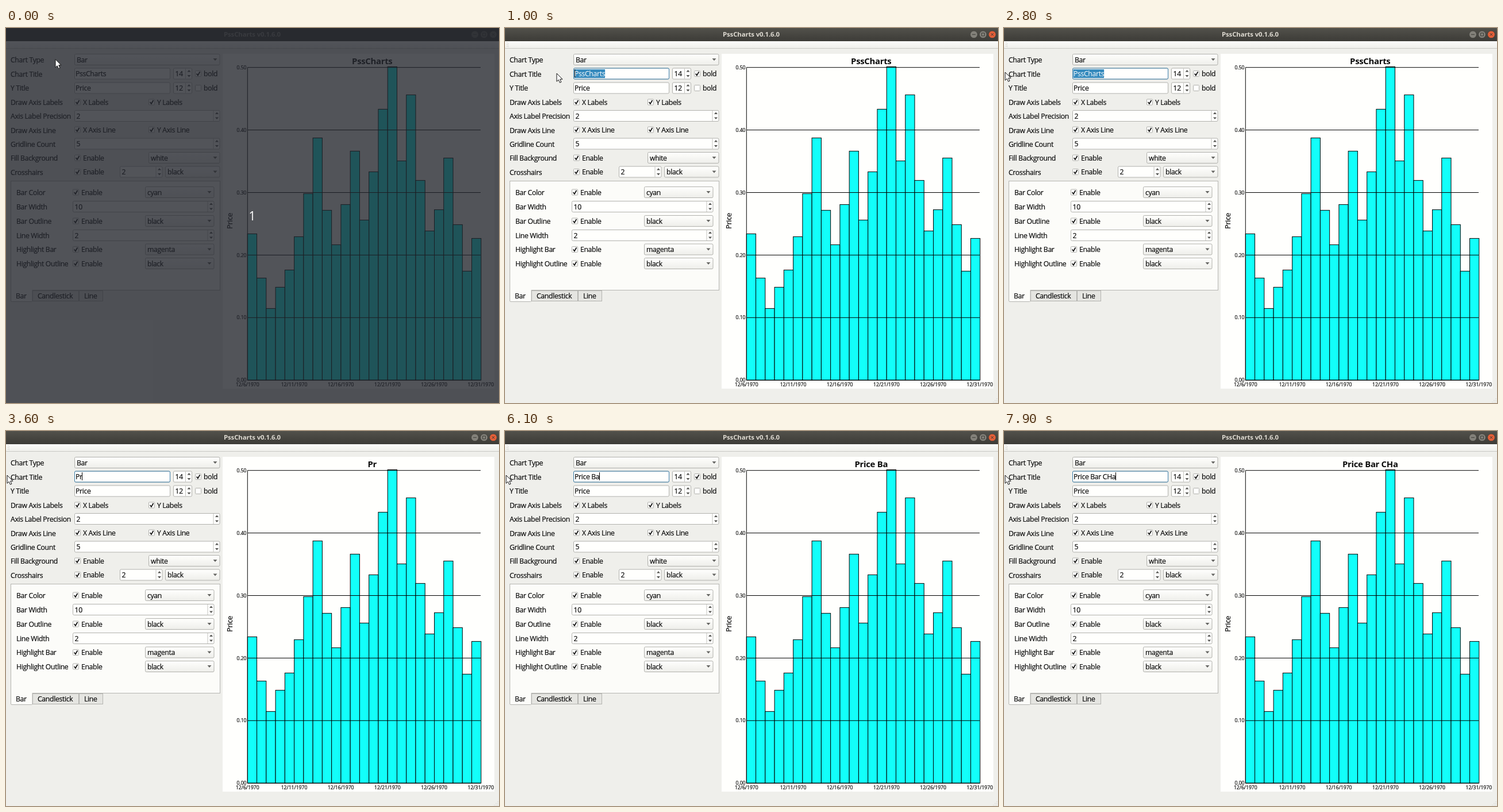
An HTML page that plays this animation: 858 by 653 pixels, repeating every 8 s.

```html
<!DOCTYPE html>
<html lang="en">
<head>
<meta charset="utf-8">
<title>Chart settings</title>
<style>
  html, body { margin: 0; width: 100%; height: 100%; overflow: hidden; background: #efefeb; }
  svg { display: block; }
  text { font: 12.2px 'Open Sans', 'Noto Sans', sans-serif; letter-spacing: -.32px; fill: #0c0c0c; stroke: #0c0c0c; stroke-width: .22px; white-space: pre; }
  .heading { font-size: 14.9px; font-weight: 700; letter-spacing: -.3px; text-anchor: middle; stroke: none; }
  .caption { font-size: 11.4px; font-weight: 700; letter-spacing: -.12px; text-anchor: middle; stroke: none; }
  .tick { font-size: 8.6px; letter-spacing: 0; }
  .light { fill: #fff; stroke: none; }
  .mid { text-anchor: middle; }
  .end { text-anchor: end; }
  .crisp { shape-rendering: crispEdges; }
</style>
</head>
<body>
<svg id="stage" width="858" height="653" viewBox="0 0 858 653"></svg>
<script>
const LOOP = 8000;
const stage = document.getElementById('stage');

// Drawing helpers
const label = (x, cy, s) => `<text x="${x}" y="${cy + 4.5}">${s}</text>`;
const rect = (x, y, w, h, attrs) => `<rect x="${x}" y="${y}" width="${w}" height="${h}" ${attrs}/>`;
const path = (d, attrs = '') => `<path d="${d}" ${attrs}/>`;

// Widgets: left edge, right edge, vertical centre, content
const frame = (l, r, cy, fill) =>
  rect(l + .5, cy - 9.5, r - l - 1, 19, `rx="2" fill="${fill}" stroke="#b1b1ad"`);
const field = (l, r, cy, s) => frame(l, r, cy, '#fffffd') + label(l + 2, cy, s);
const combo = (l, r, cy, s) => frame(l, r, cy, 'url(#button)') + label(l + 4, cy, s) +
  path(`M${r - 12} ${cy - 2}h7l-3.5 4z`, 'fill="#666663"');
const spin = (l, r, cy, s) => frame(l, r, cy, '#fffffd') + label(l + 3.5, cy, s) +
  path(`M${r - 11.5} ${cy - 9}v18`, 'stroke="#c4c4c0"') +
  path(`M${r - 8.5} ${cy - 3}h6l-3-3.5zM${r - 8.5} ${cy + 2.5}h6l-3 3.5z`, 'fill="#555552"');
const check = (x, cy, s, on = true) =>
  rect(x - 5, cy - 5, 10, 10, 'rx="1" fill="#fffffd" stroke="#b1b1ad"') +
  (on ? path(`M${x - 2.8} ${cy}l2.2 3l3.6-6.2`, 'fill="none" stroke="#111" stroke-width="1.7"') : '') +
  label(x + 9.5, cy, s);

function form() {
  const names = ['Chart Type', 'Chart Title', 'Y Title', 'Draw Axis Labels', 'Axis Label Precision',
    'Draw Axis Line', 'Gridline Count', 'Fill Background', 'Crosshairs'];
  return names.map((s, i) => label(8, Math.round(55.3 + i * 24.45), s)).join('') +
    combo(119, 372.5, 55, 'Bar') +
    field(119, 286, 79.5, '') + spin(291, 324, 79.5, '14') + check(334.5, 79.5, 'bold') +
    field(119, 286, 104.5, 'Price') + spin(291, 324, 104.5, '12') + check(334.5, 104.5, 'bold', false) +
    check(124.5, 129, 'X Labels') + check(253.5, 129, 'Y Labels') +
    spin(119, 372.5, 153, '2') +
    check(124.5, 177, 'X Axis Line') + check(253.5, 177, 'Y Axis Line') +
    spin(119, 372.5, 201.5, '5') +
    check(124.5, 226, 'Enable') + combo(248, 372.5, 226, 'white') +
    check(124.5, 250.5, 'Enable') + spin(198, 272.5, 250.5, '2') + combo(277, 372.5, 250.5, 'black');
}

function tabs() {
  const edge = 'stroke="#b5b5b1"';
  const row = (cy, name, color) => label(18, cy, name) + check(121.5, cy, 'Enable') + combo(242, 362.5, cy, color);
  return rect(8.5, 266.5, 364, 190, `fill="#fcfcf9" ${edge}`) +
    rect(46.5, 457.5, 80, 18, `fill="#e5e5e1" ${edge}`) +
    rect(127.5, 457.5, 41, 18, `fill="#e5e5e1" ${edge}`) +
    path('M8.5 456V475q0 1.5 1.5 1.5H44.5q1.5 0 1.5-1.5V456', `fill="#fcfcf9" ${edge}`) +
    label(17, 466.5, 'Bar') + label(55, 466, 'Candlestick') + label(136, 466, 'Line') +
    row(286, 'Bar Color', 'cyan') +
    label(18, 311, 'Bar Width') + spin(116, 362.5, 311, '10') +
    row(336, 'Bar Outline', 'black') +
    label(18, 361, 'Line Width') + spin(116, 362.5, 361, '2') +
    row(385.5, 'Highlight Bar', 'magenta') +
    row(410, 'Highlight Outline', 'black');
}

function chart() {
  const tops = [358, 435, 488, 451, 421, 363, 288, 191, 317, 377, 307, 214, 334,
    250, 141, 67, 231, 116, 265, 353, 316, 226, 342, 423, 366];
  const left = 420.3, base = 613.2, step = 16.26, gap = 108.9;
  const gridY = i => base - gap * (5 - i);
  let s = rect(377, 45, 473, 583, 'fill="#fffffd"') + '<g stroke="#000">';
  tops.forEach((y, i) => {
    s += rect(left + i * step, y + .4, step, base - y - .4, 'fill="#12fffa"');
  });
  for (let i = 0; i < 6; i++) s += path(`M${left} ${gridY(i)}H826`);
  s += path(`M${left} ${gridY(0)}V${base}`) + '</g>';
  for (let i = 0; i < 6; i++) {
    s += `<text class="tick end" x="418.5" y="${gridY(i) + 3.1}">${(.5 - i / 10).toFixed(2)}</text>`;
    s += `<text class="tick mid" x="${left + i * 81.2}" y="623.6">12/${i < 5 ? 6 + i * 5 : 31}/1970</text>`;
  }
  return s + '<text class="mid" transform="translate(394 336) rotate(-90)" style="font-size:12.8px">Price</text>';
}

function windowBar() {
  let s = rect(0, 0, 858, 23, 'id="bar"') + '<text id="caption" class="caption" x="428.5" y="15.2">PssCharts v0.1.6.0</text>';
  [816, 832, 848].forEach((x, i) => {
    s += `<circle class="knob" cx="${x}" cy="11.3" r="6.3" stroke="#3a3934" stroke-width=".6"/>`;
    s += path([`M${x - 3} 11.3h6`, `M${x - 2.5} 8.8h5v5h-5z`, `M${x - 2.2} 9.1l4.4 4.4m0-4.4l-4.4 4.4`][i],
      'fill="none" stroke="#3d3c37"');
  });
  s += rect(0, 23, 858, 12, 'fill="url(#tools)"') + path('M0 35.5H858', 'stroke="#c9c9c5"');
  return s + path('M3.5 25V34M5.5 26V34', 'stroke="#bdbdb9" stroke-dasharray="1 2"') +
    path('M856 645v7M853 648v4M850 651v1', 'stroke="#c6c6c2" stroke-dasharray="1 2"');
}

const gradient = (id, a, b) =>
  `<linearGradient id="${id}" x2="0" y2="1"><stop stop-color="${a}"/><stop offset="1" stop-color="${b}"/></linearGradient>`;

stage.innerHTML = '<defs>' + gradient('button', '#fffffd', '#eeeeea') +
  gradient('tools', '#fdfdfb', '#efefeb') + gradient('active', '#52514b', '#3c3b37') + '</defs>' +
  rect(0, 0, 858, 653, 'fill="#efefeb"') + windowBar() + form() + tabs() + chart() +
  '<text id="heading" class="heading" x="637.3" y="63"></text>' +
  rect(119.5, 70, 166, 19, 'id="focus" rx="2" fill="none" stroke="#3d80ab"') +
  rect(120, 72, 0, 15, 'id="selection" fill="#358abd"') +
  '<text id="input" x="121" y="84"><tspan></tspan><tspan class="light"></tspan></text>' +
  rect(0, 72, 1, 14, 'id="caret" class="crisp" fill="#000"') +
  '<g id="shade">' + rect(0, 0, 858, 653, 'fill="rgb(35,38,45)" fill-opacity=".785"') +
  '<text x="422.5" y="334.5" class="light" style="font-size:21px">1</text></g>' +
  path('M0 0V14.2L3.2 11.2L5.4 16.2L7.9 15.1L5.7 10.2H10z', 'id="arrow" fill="#fff" stroke="#111"') +
  path('M-3-8H-1L0-7L1-8H3M0-7V7M-3 8H-1L0 7L1 8H3', 'id="beam" fill="none" stroke="#111"');

const $ = id => document.getElementById(id);
const show = (id, on) => $(id).setAttribute('visibility', on ? 'visible' : 'hidden');
const [plain, picked] = $('input').children;
const knobs = document.querySelectorAll('.knob');

// Title text as it is typed: start time, content
const typing = [[0, 'PssCharts'], [3100, 'P'], [3600, 'Pr'], [3700, 'Pri'], [4100, 'Pric'], [4300, 'Price'],
  [4500, 'Price '], [5800, 'Price B'], [6100, 'Price Ba'], [6300, 'Price Bar'], [6500, 'Price Bar '],
  [7000, 'Price Bar C'], [7200, 'Price Bar CH'], [7400, 'Price Bar CHa'], [7600, 'Price Bar CHar'],
  [7900, 'Price Bar CHa']];

// Pointer: start time, x, y
const pointer = [[0, 86, 54.5], [400, 112.5, 69.5], [500, 142, 76], [600, 166, 80], [700, 180, 80], [900, 140, 80],
  [1000, 90, 79], [1100, 50, 78], [1200, 21.5, 77], [1300, 2, 77]];

const at = (list, t) => list.findLast(k => k[0] <= t);
const between = (t, a, b) => t >= a && t < b;

function draw(time) {
  const t = Math.floor(time / 100) * 100;
  const text = at(typing, t)[1];
  const [, px, py] = at(pointer, t);
  const active = t >= 800;
  const selecting = between(t, 900, 3100);
  const cut = selecting ? (t < 1000 ? 3 : 0) : text.length;

  show('shade', t < 400);
  show('focus', active);
  $('bar').setAttribute('fill', active ? 'url(#active)' : '#3d3c38');
  $('caption').style.fill = active ? '#dedad1' : '#87867f';
  knobs.forEach((k, i) => k.setAttribute('fill', !active ? '#66655e' : i === 2 ? '#e55f38' : '#83817a'));

  $('heading').textContent = text;
  plain.textContent = text.slice(0, cut);
  picked.textContent = text.slice(cut);
  const start = cut ? plain.getComputedTextLength() : 0;
  const total = $('input').getComputedTextLength();
  $('selection').setAttribute('x', 120.5 + start);
  $('selection').setAttribute('width', selecting ? total - start + .5 : 0);

  $('caret').setAttribute('x', Math.round(120.6 + start));
  show('caret', between(t, 800, 1600) || between(t, 2200, 2800) || (t >= 3100 && t !== 5500));

  const overField = between(t, 500, 1000);
  show('beam', overField);
  show('arrow', !overField);
  $(overField ? 'beam' : 'arrow').setAttribute('transform', `translate(${px} ${py})`);
}

const begin = performance.now();
function tick() {
  draw((performance.now() - begin) % LOOP);
  requestAnimationFrame(tick);
}
tick();
</script>
</body>
</html>
```
